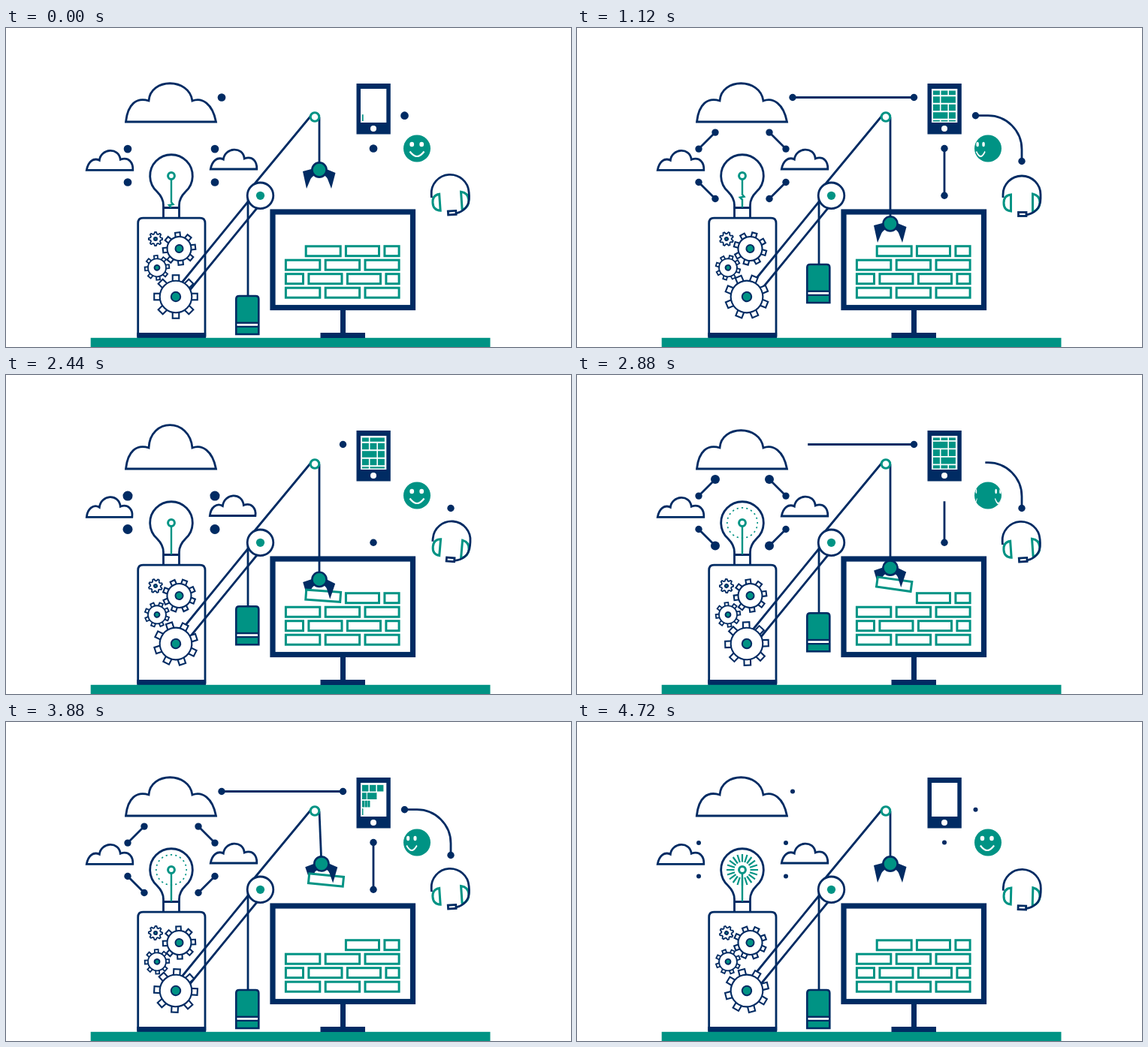
Write an HTML page that moves like this. It is 752 px wide and 425 px high and loops after 4760 ms.

```html
<!DOCTYPE html>
<html lang="en">
<head>
<meta charset="utf-8">
<title>Workshop</title>
<style>
html, body { margin: 0; width: 100%; height: 100%; overflow: hidden; background: #fff; }
svg { display: block; width: 100vw; height: 100vh; }
.n { fill: #002b63; }
.t { fill: #009384; }
.w { fill: #fff; }
.ns { stroke: #002b63; stroke-width: 2.8; fill: none; }
.ts { stroke: #009384; stroke-width: 2.8; fill: none; }
.nw { stroke: #002b63; stroke-width: 2.8; fill: #fff; }
.tw { stroke: #009384; stroke-width: 3; fill: #fff; }
</style>
</head>
<body>
<svg viewBox="0 0 752 425">
  <defs>
    <clipPath id="screen"><rect x="473" y="83.5" width="32" height="41"/></clipPath>
    <clipPath id="ball"><circle cx="547" cy="160.5" r="18"/></clipPath>
  </defs>
  <rect class="w" width="752" height="425"/>
  <g id="clouds"></g>
  <g id="links"></g>

  <path class="nw" d="M209.5 252V236C209.5 228 206 223 201 218A28.3 28.3 0 1 1 239 218C234 223 230.5 228 230.5 236V252M209.5 239.5H230.5"/>
  <path id="rays" class="ts" style="stroke-width:2.2"/>
  <path id="wire" class="ts" style="stroke-width:2.4"/>
  <circle class="tw" cx="220" cy="197" r="4.4"/>

  <path class="nw" d="M175.7 410V260Q175.7 253.2 182.5 253.2H258Q265 253.2 265 260V410Z"/>
  <rect class="n" x="174.3" y="406" width="91.8" height="7.5"/>
  <path class="ns" d="M233 340.5L322 231.5M244 350L334 240M405 118L328 211"/>
  <g id="gears"></g>

  <line id="rope" class="ns" x1="322" y1="228" x2="322"/>
  <g id="weight">
    <path class="t" stroke="#002b63" stroke-width="2.6" d="M306.3 51V4Q306.3 0 310.3 0H332.3Q336.3 0 336.3 4V51Z"/>
    <rect class="n" x="306" y="34.6" width="30.5" height="7.4"/>
    <rect class="w" x="307.5" y="37" width="27.5" height="2.8"/>
  </g>
  <circle class="nw" cx="338.5" cy="223.3" r="17.3"/>
  <circle class="t" cx="338.5" cy="223.3" r="5.6"/>

  <rect class="t" x="112.7" y="412.8" width="531.8" height="12.2"/>
  <path class="n" d="M445 374H452V406H478V413H418.5V406H445Z"/>
  <rect x="355" y="245" width="186.5" height="127.5" fill="#fff" stroke="#002b63" stroke-width="7.2"/>
  <g id="wall"></g>

  <g id="claw">
    <line id="cable" class="ns" x1="417" y1="119" x2="417"/>
    <g id="hand">
      <path id="jawL" class="n" d="M-7 -2L-22 2L-17 25L-11.5 12Q-9 8 -5 7Z"/>
      <rect id="load" class="tw" x="-23" y="-6.4" width="46" height="13"/>
      <path id="jawR" class="n" d="M7 -2L21.5 4L16 25L11 12Q9 8 5 7Z"/>
      <circle class="t" r="9.6" stroke="#002b63" stroke-width="2.6"/>
    </g>
  </g>
  <circle class="tw" cx="411" cy="118.5" r="5.8"/>

  <rect class="n" x="466.5" y="74" width="45.3" height="67.5"/>
  <rect class="w" x="472" y="81" width="34.3" height="45"/>
  <circle class="w" cx="489" cy="134" r="4"/>
  <g clip-path="url(#screen)"><path id="tiles" class="t"/></g>

  <circle class="t" cx="547" cy="160.5" r="18"/>
  <g id="face" clip-path="url(#ball)"></g>

  <g id="headset">
    <path class="tw" d="M577.5 222V244Q568 243 568 233T577.5 222Z"/>
    <path class="tw" d="M606.5 221V245Q616 242 616 232.5T606.5 221Z"/>
    <path class="ns" d="M567 226V222A25 25 0 0 1 617 222V227C617 240 609 247 598 249"/>
    <rect class="nw" x="587.5" y="245.5" width="10.5" height="5"/>
  </g>
</svg>
<script>
const LOOP = 4760;
const $ = id => document.getElementById(id);
const set = (el, attrs) => { for (const k in attrs) el.setAttribute(k, attrs[k]); return el; };
const add = (parent, tag, attrs) =>
  parent.appendChild(set(document.createElementNS('http://www.w3.org/2000/svg', tag), attrs));
const clamp = v => Math.min(1, Math.max(0, v));
const ramp = (t, a, b) => clamp((t - a) / (b - a));
const inOut = u => u < .5 ? 2 * u * u : 1 - 2 * (1 - u) ** 2;
const backOut = u => 1 + 2.9 * (u - 1) ** 3 + 1.9 * (u - 1) ** 2;

// Time relative to the nearest beat of a repeating pulse, and a smooth bump around it.
const beat = (t, peak) => t - peak - Math.round((t - peak) / 960) * 960;
const bump = (t, peak, width) => {
  const d = Math.abs(beat(t, peak));
  return d < width ? Math.cos(d / width * Math.PI / 2) ** 2 : 0;
};

// Clouds
const cloudEls = [0, 1, 2].map(() => add($('clouds'), 'path', { class: 'nw' }));
function drawClouds(t) {
  const top = 66 - 9.5 * bump(t, 500, 300), s = 2 * bump(t, 720, 200), m = bump(t, 560, 300);
  set(cloudEls[0], { d: `M${159.5 - s} 125C${162 - s} ${101 - 3 * s} ${174 - s} ${92 - s} 190 97` +
    `C192 ${top} 244 ${top} 248 97C261 92 275 101 279.5 125Z` });
  const small = (x, y) => `M${x} ${y}C${x + 2 - m} ${y - 11} ${x + 9} ${y - 17 - m} ${x + 17} ${y - 13}` +
    `C${x + 19} ${y - 29 - m} ${x + 43} ${y - 31 - m} ${x + 45} ${y - 14}` +
    `C${x + 56 - m} ${y - 18} ${x + 62} ${y - 10} ${x + 61.5 - m} ${y}Z`;
  set(cloudEls[1], { d: small(107.3, 189.3) });
  set(cloudEls[2], { d: small(272.3 - m, 188 - m / 2) });
}

// Connecting lines with dots that pop in and shrink away
function dot(t, on, off) {
  const u = ramp(t, on, on + 220);
  return 4.7 * (u + .85 * Math.sin(Math.PI * u)) * clamp((off - t) / 80);
}
const restart = t => dot(t, -80, 9e3 * (t < 4600)) || dot(t, 4680, 9e3);

function mainPlan(t) {
  return {
    from: ramp(t, 1680, 2200) - ramp(t, 2460, 2940),
    to: ramp(t, 60, 620) - ramp(t, 4000, 4460),
    first: t < 4600 ? dot(t, -80, 1600) || dot(t, 2920, 4500) : dot(t, 4680, 9e3),
    last: dot(t, 580, 4000)
  };
}
function cloudPlan(t) {
  const p = (t + 40) % 2400 - 40, end = t < 2360 ? 1800 : 1560;
  return {
    from: ramp(p, end, end + 400),
    to: ramp(p, 100, 420),
    first: t < 4600 ? dot(p, -80, end) : dot(t, 4680, 9e3),
    last: dot(p, 300, end + 430)
  };
}
function link(plan, x1, y1, x2, y2, mid = 'L') {
  return {
    plan,
    line: add($('links'), 'path', { class: 'ns', pathLength: 1, d: `M${x1} ${y1}${mid}${x2} ${y2}` }),
    dots: [[x1, y1], [x2, y2]].map(([cx, cy]) => add($('links'), 'circle', { class: 'n', cx, cy }))
  };
}
const links = [
  link(mainPlan, 287, 92.5, 448.5, 92.5),
  link(mainPlan, 489, 160.5, 489, 223.3),
  link(mainPlan, 530.5, 116.7, 592, 177.5, 'H547A45 45 0 0 1 592 161.7L')
];
for (const sx of [-1, 1]) for (const sy of [-1, 1])
  links.push(link(cloudPlan, 220 + sx * 58, 183.3 + sy * 22.2, 220 + sx * 36, 183.3 + sy * 44.2));
function drawLinks(t) {
  for (const { plan, line, dots } of links) {
    const { from, to, first, last } = plan(t);
    set(line, { 'stroke-dasharray': `0 ${from} ${Math.max(0, to - from)} 2`, visibility: to > from ? 'visible' : 'hidden' });
    set(dots[0], { r: first });
    set(dots[1], { r: last });
  }
}

// Bulb: a spark climbs the wire, then the rays flash outward
function drawBulb(t) {
  const p = t % 1000, rays = 20;
  const outer = 11 + 10 * ramp(p, 530, 680), inner = 10.5 + 10.5 * ramp(p, 720, 910);
  let d = '';
  if (p > 530 && outer > inner) for (let i = 0; i < rays; i++) {
    const c = Math.cos(i / rays * 2 * Math.PI), s = Math.sin(i / rays * 2 * Math.PI);
    d += `M${220 + inner * s} ${197 - inner * c}L${220 + outer * s} ${197 - outer * c}`;
  }
  set($('rays'), { d });
  const y = 232 - p * .085;
  set($('wire'), { d: p < 330 ? `M220 201V${y}l2.5 3l-5.5 1l3 3V239` : 'M220 201V239' });
}

// Gears: teeth around a ring; the smallest is a single outline
function gear(x, y, r, hub, turn) {
  const g = add($('gears'), 'g', {}), out = r * 1.35, w = r * .4;
  const thin = { class: 'nw', style: `stroke-width:${r > 15 ? 2.1 : 1.8}` };
  if (r < 10) {
    let d = '';
    for (let i = 0; i < 32; i++) {
      const a = (i - 1.5) / 16 * Math.PI, q = i % 4 === 1 || i % 4 === 2 ? out : r;
      d += `${i ? 'L' : 'M'}${q * Math.sin(a)} ${-q * Math.cos(a)}`;
    }
    add(g, 'path', { ...thin, d: d + 'Z' });
  } else {
    for (let i = 0; i < 8; i++)
      add(g, 'rect', { ...thin, x: -w / 2, y: -out, width: w, height: out - r + 2, transform: `rotate(${i * 45})` });
    add(g, 'circle', { ...thin, r });
  }
  add(g, 'circle', { class: 't', r: hub, stroke: '#002b63', 'stroke-width': 2 });
  return t => set(g, { transform: `translate(${x} ${y}) rotate(${turn + t * .14})` });
}
const gears = [
  gear(226, 358, 21.3, 6.2, 0),
  gear(230.5, 294, 16, 5, -6),
  gear(201, 319.3, 12, 3.4, -6),
  gear(199, 281, 6.8, 2, 0)
];
const drawGears = t => gears.forEach(turn => turn(t));

// Brick wall in running bond, trimmed to the screen; the crane holds the first top brick
for (let row = 0; row < 4; row++) {
  const odd = row % 2, pitch = odd ? 52.8 : 51.5;
  for (let k = row ? 0 : 2; k < 4; k++) {
    const x = (odd ? 371 : 349 + row - 1) + k * pitch;
    const left = Math.max(371, x), right = Math.min(524.5, x + pitch - 4.6);
    if (right > left)
      add($('wall'), 'rect', { class: 'tw', x: left + 1.4, y: 290.7 + row * 18.5, width: right - left - 2.8, height: 13 });
  }
}

// Crane: lower, grip, tug the brick loose, swing, let go
function drawCrane(t) {
  const y = 189 + 89 * inOut(ramp(t, 430, 1430)) - 21 * ramp(t, 2280, 2880) - 68 * backOut(ramp(t, 2880, 3340));
  const u = ramp(t, 3300, 4100);
  const swing = 5 * (1 - u * u) * Math.sin(u * 2.1 * Math.PI);
  const grip = 4 * (ramp(t, 2200, 2320) - ramp(t, 4080, 4160));
  const fall = ramp(t, 4120, 4420);
  const tilt = 8 * (Math.sqrt(ramp(t, 2280, 2880)) - fall);
  const rest = 297.2 - y, held = 19.2 + 2.5 * ramp(t, 2280, 2440);
  const dy = t < 2280 ? rest : held + (rest - held) * fall * fall;
  const top = 357 - (y - 189) * .585;
  set($('claw'), { transform: `rotate(${swing} 417 119)` });
  set($('cable'), { y2: y });
  set($('hand'), { transform: `translate(417 ${y})` });
  set($('jawL'), { transform: `rotate(${-grip})` });
  set($('jawR'), { transform: `rotate(${grip})` });
  set($('load'), { transform: `translate(5.2 ${dy}) rotate(${tilt})` });
  set($('rope'), { y2: top });
  set($('weight'), { transform: `translate(0 ${top})` });
}

// Phone tiles: rows wipe in from below, scroll up, wipe out
const ROWS = [[1, 1, 1], [1, 2], [1, 1, 1], [2, 1]];
function drawPhone(t) {
  const scroll = ramp(t, 1000, 1400) + 3 * ramp(t, 2310, 3430);
  const base = Math.floor(scroll), shift = scroll - base;
  let d = '';
  for (let i = 0; i < 5; i++) {
    const rank = Math.max(0, 3 - i);
    const k = ramp(t, rank * 90 - 20, rank * 90 + 320) - ramp(t, 3500 + rank * 120, 3900 + rank * 120);
    let x = 0;
    for (const n of ROWS[(base + i) % 4]) {
      const w = n * 10.5 - 1.6;
      if (k > 0) d += `M${474 + x * k} ${83.8 + (i - shift) * 10.5}h${w * k}v8.7h${-w * k}z`;
      x += n * 10.5;
    }
  }
  set($('tiles'), { d });
}

// Face: features slide around the ball, narrowing towards its edges
const faces = [-40, 0, 40].map(shift => {
  const g = add($('face'), 'g', {});
  for (const cx of [-6.8, 6.2]) add(g, 'ellipse', { class: 'w', cx, cy: -5.5, rx: 2.9, ry: 3.2 });
  add(g, 'path', { d: 'M-9.5 4Q0 17 9.5 4', fill: 'none', stroke: '#fff', 'stroke-width': 2.2 });
  return { g, shift };
});
function drawFace(t) {
  const turn = (t % 2440 / 2440) ** .48;
  for (const { g, shift } of faces) {
    const s = shift + turn * 40;
    set(g, { transform: `translate(${547 + s * .78} 160.5) scale(${Math.max(.01, 1 - Math.abs(s) / 32)} 1)` });
  }
}

// Headset tips over on each beat, then springs back
function drawHeadset(t) {
  const q = beat(t, 760);
  const r = 14 * (q < 0 ? ramp(q, -330, 0) ** .8 : (1 - ramp(q, 0, 340)) * Math.cos(q / 270 * Math.PI));
  set($('headset'), { transform: `translate(${r * .2} ${-Math.abs(r) * .42}) rotate(${r} 592 223)` });
}

function draw(t) {
  for (const part of [drawClouds, drawLinks, drawBulb, drawGears, drawCrane, drawPhone, drawFace, drawHeadset]) part(t);
}
let start;
function tick(now) {
  start ??= now;
  draw((now - start) % LOOP);
  requestAnimationFrame(tick);
}
draw(0);
requestAnimationFrame(tick);
</script>
</body>
</html>
```
